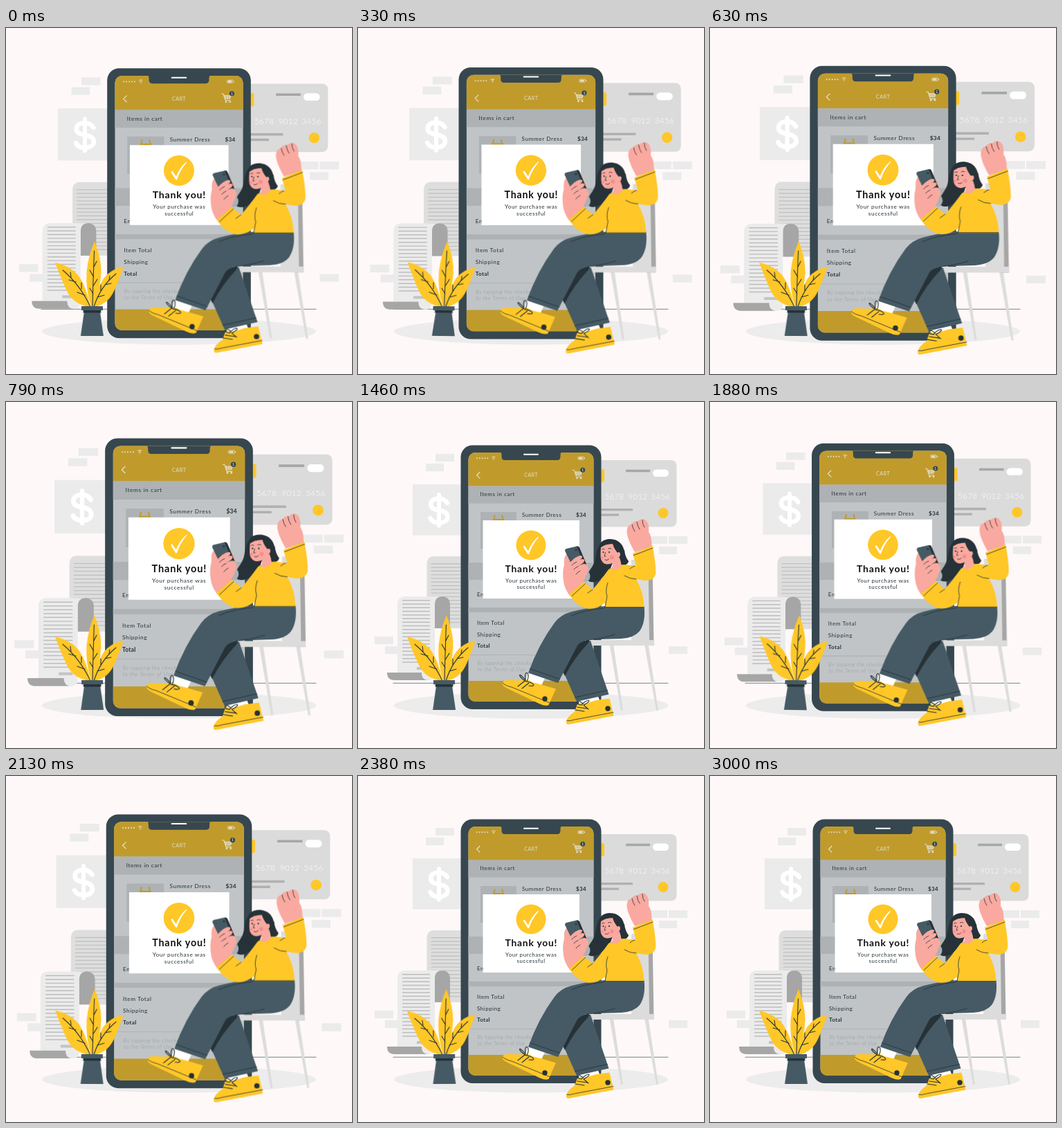
An HTML page for the animation above (3040 ms loop, 500 px wide and 500 px high).

```html
<!DOCTYPE html>
<html lang="en">
<head>
<meta charset="utf-8">
<title>Thank you</title>
<style>
  html, body { margin: 0; width: 100%; height: 100%; overflow: hidden; background: #fef8f8; }
  svg { display: block; width: 100vw; height: 100vh; }
  text { font: 8px Lato, "Open Sans", sans-serif; letter-spacing: .55px; fill: #263238; }
  .bold { font-weight: 700; letter-spacing: .3px; }
  .title { font-size: 13.8px; font-weight: 700; letter-spacing: .8px; fill: #111; }
  .mid { text-anchor: middle; }
  .small { font-size: 7.6px; font-weight: 300; font-style: italic; letter-spacing: .5px; fill: #92989b; }
  .digits { font-size: 11.3px; font-weight: 300; letter-spacing: .4px; fill: #fff; }

  .yellow { fill: #ffc727; }
  .skin { fill: #f9a9a0; }
  .cloth { fill: #455a64; }
  .ink { fill: #263238; }
  .brick { fill: #ebebeb; }
  .dark { fill: #a6a6a6; }
  .chair { fill: #dcdcdc; }
  .band { fill: #aeb2b4; }
  .gold { fill: #c09b2c; }
  .pale { fill: #e4dfcc; }
  .line { fill: none; stroke: #263238; stroke-width: .8; stroke-linecap: round; stroke-linejoin: round; }
  .lace { stroke-width: 1.1; }
  .white { fill: none; stroke: #fff; stroke-linecap: round; stroke-linejoin: round; }

  .beat { animation: beat 3040ms linear infinite; }
  #back { transform-origin: 250px 238.5px; }
  #phone { transform-origin: 250px 253px; }
  #woman { transform-origin: 320.5px 317.5px; }
  #plant { transform-origin: 120px 376px; animation: wind 1520ms linear -36ms infinite; }

  /* two double beats; the loop starts just after the first rise begins */
  @keyframes beat {
    0% { transform: scale(1.022); }
    3.9%, 23.7%, 53.45%, 73.2% { transform: scale(1.1); }
    13.8%, 18.75%, 28.6%, 48.4%, 63.3%, 68.25%, 78.1%, 100% { transform: scale(1); }
  }
  @keyframes wind {
    0%, 100% { transform: rotate(0deg); }
    25% { transform: rotate(1deg); }
    75% { transform: rotate(-1deg); }
  }
</style>
</head>
<body>
<svg viewBox="0 0 500 500">
  <rect width="500" height="500" fill="#fef8f8"/>
  <ellipse cx="250" cy="438.5" rx="198" ry="19" fill="#ececec"/>
  <path class="line" style="stroke-width:.6" d="M51 406.300H448"/>

  <g id="back" class="beat">
    <path class="brick" d="M112 75h27v11h-27z M98 89h26v11h-26z M24 339h27v11h-27z M39 353h27v11h-27z
      M420 194h27v11h-27z M449 194h27v11h-27z M435 209h26v11h-26z M449 353h27v11h-27z"/>

    <!-- money -->
    <path class="brick" d="M79 119h90v73.500h-90z"/>
    <path class="white" stroke-width="6" d="M117 134V178.500"/>
    <path class="white" stroke-width="6.500" d="M129 146C126 141 122 139.500 117 139.500C109 139.500 105 143 105 148C105 154 111 155.500 117 156.500C124 157.700 129.500 160 129.500 166C129.500 171.500 124 174.500 117 174.500C110 174.500 106.500 172 104.500 168"/>

    <!-- receipts -->
    <path fill="#dedede" d="M170 223H110Q99.500 223 99.500 235V327H170Z"/>
    <path d="M127 233V321" stroke="#c2c2c2" stroke-width="43" stroke-dasharray="1.400 3.900"/>
    <path class="dark" d="M111 281H122Q133 282 133 293V327H111Z"/>
    <path class="brick" d="M122 281H69Q57 281 57 293V391H92Q92 402 102 402Q111 402 111 391V293Q111 281 122 281Z"/>
    <path d="M84 286V377" stroke="#bdbdbd" stroke-width="40" stroke-dasharray="1.400 3.850"/>
    <path fill="#c4c4c4" d="M85 383h19v4h-19z"/>
    <path class="dark" d="M42 391H92Q92 402 102 402H53Q42 402 42 391Z"/>

    <!-- bank card -->
    <rect x="300" y="84" width="160.500" height="96.500" rx="8" fill="#dbdbdb"/>
    <rect class="yellow" x="330" y="97" width="26" height="19" rx="3"/>
    <path class="dark" d="M387 97.700h35v3.500h-35z"/>
    <rect x="426" y="97.500" width="23" height="10.500" rx="5.200" fill="#fff"/>
    <text class="digits" x="356.500" y="141">5678</text>
    <text class="digits" x="390.500" y="141">9012</text>
    <text class="digits" x="423.500" y="141">3456</text>
    <path fill="#b0b0b0" d="M330 154h67v3.300h-67z M330 161.500h47v3.300h-47z"/>
    <circle class="yellow" cx="441" cy="160.500" r="7.500"/>
  </g>

  <g id="phone" class="beat">
    <rect x="148.500" y="62.500" width="203" height="381.500" rx="17" fill="#37474f"/>
    <clipPath id="screen"><rect x="159.500" y="73" width="181" height="360" rx="10"/></clipPath>
    <g clip-path="url(#screen)">
      <path fill="#c0c4c6" d="M159 72h182v362h-182z"/>
      <path class="gold" d="M159 72h182v49.500h-182z M159 403h182v31h-182z"/>
      <path class="band" d="M159 121.500h182v25h-182z M177 159h52v53h-52z M159 232h182v25h-182z M159 297h182v7h-182z"/>
      <path d="M159 365.500H341" stroke="#aeb2b4"/>
      <path d="M195.500 172L198 163.500M210.500 172L208 163.500M195 170H211" fill="none" stroke="#c09b2c" stroke-width="2"/>
      <path fill="#37474f" d="M203 72Q207.500 72 207.500 76V79Q207.500 84 212 84H288Q292.500 84 292.500 79V76Q292.500 72 297 72Z"/>
    </g>
    <path class="white" stroke-width="2" d="M240 75.700H260"/>

    <path d="M172 81.300H189" stroke="#e4dfcc" stroke-width="2" stroke-linecap="round" stroke-dasharray="0 3.800"/>
    <path d="M193.500 80Q196 78 198.500 80M194.800 81.700Q196 80.700 197.200 81.700" fill="none" stroke="#e4dfcc"/>
    <circle class="pale" cx="196" cy="83" r=".7"/>
    <rect x="318" y="79.200" width="8.500" height="4" rx="1" fill="none" stroke="#e4dfcc" stroke-width=".8"/>
    <path class="pale" d="M319 80h5.500v2.500h-5.500z M327 80.500h1v1.600h-1z"/>
    <path class="white" style="stroke:#e4dfcc" stroke-width="1.200" d="M176 101.300L171.500 105.700L176 110.200"/>
    <text class="mid" x="250.200" y="108.300" style="font-size:7px;fill:#e4dfcc">CART</text>
    <path class="pale" d="M313.200 100.500H324.500L322 106H315Z"/>
    <path class="white" style="stroke:#e4dfcc" d="M310.500 98.500H312.500L315.500 108H323"/>
    <path d="M314 102.300H323.500M314.500 104.200H322.500M317 100.500V106M320 100.500V106" stroke="#c09b2c" stroke-width=".4"/>
    <circle class="pale" cx="316.500" cy="110" r="1.300"/>
    <circle class="pale" cx="322" cy="110" r="1.300"/>
    <circle cx="324.700" cy="98.300" r="3.500" fill="#37474f"/>
    <text class="mid" x="324.700" y="100.100" style="font-size:5px;letter-spacing:0;fill:#fff">1</text>

    <text x="176.500" y="136.300">Items in cart</text>
    <text x="237" y="165.600">Summer Dress</text>
    <text class="bold" x="315" y="165.600">$34</text>
    <text x="172" y="281">Enter code</text>
    <text x="172" y="322">Item Total</text>
    <text x="172" y="338.800">Shipping</text>
    <text class="bold" x="172" y="355.200">Total</text>
    <text class="small" x="172.500" y="380">By tapping the checkout</text>
    <text class="small" x="172.500" y="389.200">to the Terms of Use</text>

    <path fill="#fff" d="M180.500 171h139.500v113h-139.500z"/>
    <circle class="yellow" cx="250" cy="207" r="21.500"/>
    <path fill="#fff" d="M238.500 209L240.500 207.500L246 215.500Q250.500 203 260.500 194.500L261 195.500Q252 205.500 247 220H245.500Z"/>
    <text class="mid title" x="250.400" y="246.300">Thank you!</text>
    <text class="mid" x="250.200" y="261">Your purchase was</text>
    <text class="mid" x="250.200" y="270.200">successful</text>
  </g>

  <g id="woman" class="beat">
    <!-- chair -->
    <path class="chair" d="M363.500 350H369L383 446H380Z M414 350H419.500L434 446H431Z"/>
    <path class="dark" d="M414 225H422Q425 226 425.500 232L427.500 352H416Z"/>
    <path class="chair" d="M395 228H416Q419 229 419.500 234L421 344H427.500V352H336Q329 352 326 344H395Z"/>

    <!-- far leg and shoe -->
    <path fill="#fff" d="M318 428L346 423L350 433L320 440Z"/>
    <path class="yellow" d="M301 461Q303 454 313 447.500L317 436.500Q322 434 328 436Q338 433 344 431L363.500 428.500L369.500 453.500L304 466Q300 466 301 461Z"/>
    <path class="line" d="M302 460.500Q306 461.500 313 459L369 448.500"/>
    <path class="line lace" d="M314 445L327 447M317 441L331 443M325 436C318 428 311 437 323 438C330 428 342 430 326 438L333 444"/>
    <circle class="ink" cx="361" cy="443" r="3.700"/>
    <path class="cloth" d="M300 345H336L362.500 422.500L316 433L296 388Z"/>
    <path class="ink" d="M335 342L316 350L294 386L299 396Q312 370 333 348Z"/>
    <path class="line" d="M313.500 427L360.500 416.500"/>

    <!-- near leg and shoe -->
    <path fill="#fff" d="M246 390L270 399L264 412L242 404Z"/>
    <path class="yellow" d="M209 405Q211 400.500 224 402Q234 403 240 401Q246 401 252 405L267 409L286 414.500L275.500 438Q270 440 262 436L216 414Q207 410 209 405Z"/>
    <path class="line" d="M209 406Q213 410 222 412L276.500 434.500"/>
    <path class="line lace" d="M231 411L241 403M237 414L247 406M243 404C230 396 231 388 242 402C239 385 251 390 244 404C252 405 260 412 247 410"/>
    <circle class="ink" cx="270" cy="429" r="3.700"/>
    <path class="cloth" d="M357 295H413.500Q416 318 407 331Q399 341 380 342L334 343.500Q322 345 317 352L289 406L246 391.500Q261 350 284 319Q293 307 309 303Q332 297 357 295Z"/>
    <path class="line" d="M248.500 385.500L291.500 400.500M355 298Q325 301 308 309M335 343.500Q356 341 371 336"/>

    <!-- hair behind -->
    <path class="ink" d="M350 205C343 214 345 224 341 233C337 242 330 247 331 256C334 263 347 261 354 253C361 247 366 241 367 234L384 236Q390 235 391 230Q386 224 385 214Z"/>

    <!-- raised hand -->
    <path class="skin" d="M400 217Q388 196 388.500 186Q389 178 395 177Q398 172 404 172.500Q411 167 416 171Q421 175 420 188Q425 194 424.500 209Z"/>
    <path class="line" d="M396 177Q397 183 400 187M403 173Q404 180 407 184M411 170.500Q411 177 414 181"/>

    <!-- phone, hand, forearm -->
    <ellipse cx="329" cy="252" rx="6.500" ry="8" fill="#aab1b4"/>
    <path class="skin" d="M306 280Q298 269 297 259Q295 246 298 235Q297 224 301 220Q307 218 313 223L326 224Q331 228 330 235Q335 240 331 247Q329 254 325 260L328 264Z"/>
    <path class="cloth" d="M299 215Q299 212.500 301 212L316 208.500Q319 208 320 210.500L330 234.500L312 242Z"/>
    <path class="ink" d="M316 208.500Q319 208 320 210.500L330 234.500L327.500 236Z"/>
    <circle class="ink" cx="315" cy="214" r="1.300"/>
    <path class="skin" d="M302 238Q308 229 314 225Q322 220 324 223Q325 226 316 231Q324 225 327 228Q329 231 318 237Q328 232 330 235Q331 239 321 244L307 253Z"/>
    <path class="line" d="M316 231Q311 233 309 236M318 237.500Q314 239 312 242M321 244Q317 246 315 249"/>

    <!-- sweater -->
    <path class="yellow" d="M362 242Q372 235 385 235L402 237L397 219L425.500 207.500Q431 236 430 249Q427 259 414 258L402 256Q413 275 413.500 297L357 297V290Q346 300 331 298.500Q316 295 305 278L326 260L339 271Q349 260 362 242Z"/>
    <path class="line" d="M398.500 221.500L426 211M309 280.500L328.500 262.500M339 271L332 276M361 261Q357 272 360 281Q359 286 357 296.500M402 256Q393 256 385 251M357 296.500H413M400 237Q396 238 393 241"/>

    <!-- head -->
    <path class="skin" d="M367 226L380 224Q379 232 381 236Q376 244 365 242Q369 238 367 232Z"/>
    <path class="skin" d="M351 210Q350 222 351 227Q354 235 361 234.500Q370 234 375 225L378 210L364 202Z"/>
    <path class="ink" d="M349 211C348 203 355 198 364 198C377 198 384.500 207 385 218Q386 228 391 231Q385 236 380 231Q378 227 377 220C374 217 370 212 368 205Q357 205 349 211Z"/>
    <path class="skin" d="M373 219Q378 215 379 219.500Q379 225 374 225Z"/>
    <circle cx="367" cy="224.500" r="2.700" fill="#f48d88"/>
    <circle cx="353" cy="225" r="1.800" fill="#f48d88"/>
    <circle class="ink" cx="354.500" cy="217" r="1.100"/>
    <circle class="ink" cx="363" cy="217" r="1.100"/>
    <path class="line" d="M352.500 213Q354 211.500 356 212.500M361.500 212Q364 210.500 366 212M357.500 217.500L356 223H358M357 228Q360 230 362.500 227"/>
  </g>

  <g id="plant">
    <path class="yellow" d="M128 308Q138 334 137.500 353Q136 379 127 403H123Q115 378 116.500 352Q119 328 128 308Z"/>
    <path class="yellow" d="M71 339Q93 344 104 357Q116 373 122 403Q101 401 90 384Q83 371 71 339Z"/>
    <path class="yellow" d="M169.500 345Q150 349 141 362Q131 377 127 403Q145 400 154 384Q160 373 169.500 345Z"/>
    <path class="line lace" d="M127.500 322Q126 360 125 403M127 345L131 337M126.700 360L121 350M126.500 372L132 363M126 384L121 376"/>
    <path class="line lace" d="M82 350Q107 371 122 403M94 360L93 353M101 367L91 364M109 377L109 368M114 386L103 382"/>
    <path class="line lace" d="M159 355Q136 374 127 403M149 364L150 358M143 371L152 369M137 380L137 371M132 389L142 386"/>
    <path class="cloth" d="M113 410H136L141 445H108Z"/>
    <path class="ink" d="M112 407H137L137.500 411.500H111.500Z"/>
    <path class="cloth" d="M109 402h31v6h-31z"/>
  </g>
</svg>
</body>
</html>
```
